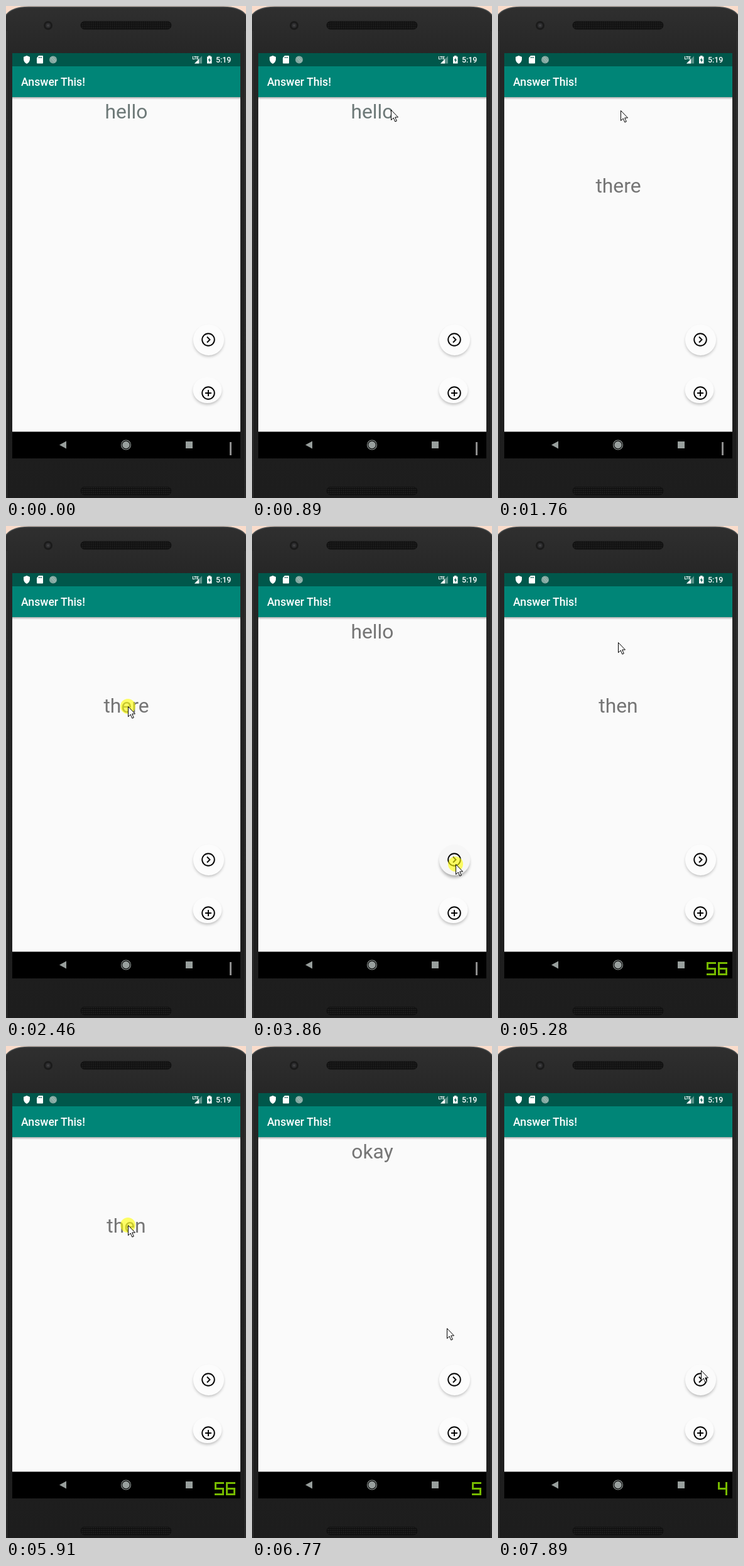
Animation of 382x783 px, one loop 8 s. Source, as an HTML page:

```html
<!DOCTYPE html>
<html lang="en">
<head>
<meta charset="utf-8">
<title>Answer This!</title>
<style>
  html, body { margin: 0; width: 100%; height: 100%; overflow: hidden; background: #fadccb; }
  svg { display: block; width: 100%; height: 100%; }
  text { font-family: Roboto, sans-serif; }
</style>
</head>
<body>
<svg viewBox="0 0 382 783">
  <defs>
    <linearGradient id="body" x1="0" y1="0" x2="0" y2="1">
      <stop offset="0" stop-color="#2f2f2f"/>
      <stop offset=".1" stop-color="#262626"/>
      <stop offset="1" stop-color="#1d1d1d"/>
    </linearGradient>
    <linearGradient id="barShade" x1="0" y1="0" x2="0" y2="1">
      <stop offset="0" stop-color="#000" stop-opacity=".3"/>
      <stop offset="1" stop-color="#000" stop-opacity="0"/>
    </linearGradient>
    <pattern id="mesh" width="3" height="3" patternUnits="userSpaceOnUse">
      <rect width="3" height="3" fill="#101010"/>
      <circle cx="1.5" cy="1.5" r=".8" fill="#2c2c2c"/>
    </pattern>
    <filter id="soft" x="-40%" y="-40%" width="180%" height="180%">
      <feGaussianBlur stdDeviation="2.6"/>
    </filter>
  </defs>

  <!-- phone -->
  <rect width="382" height="783" fill="#fadccb"/>
  <path d="M-2 785V18Q6 1.5 36 1.5H346Q376 1.5 384 18V785Z" fill="url(#body)" stroke="#4b5153" stroke-width="1.5"/>
  <path d="M1.5 40V783M380.5 40V783" stroke="#363636"/>
  <circle cx="67" cy="31" r="7" fill="#1b1b1b"/>
  <circle cx="67" cy="31" r="4" fill="#2e2e30"/>
  <circle cx="67" cy="31" r="1.8" fill="#444"/>
  <rect x="119" y="24.5" width="144" height="12.5" rx="6" fill="url(#mesh)" stroke="#121212"/>
  <rect x="119" y="765.5" width="144" height="12.5" rx="6" fill="url(#mesh)" stroke="#121212"/>

  <!-- screen -->
  <rect x="10" y="75" width="363" height="645" fill="#fafafa"/>
  <rect x="10" y="75" width="363" height="21" fill="#00574b"/>
  <rect x="10" y="96" width="363" height="49" fill="#008577"/>
  <rect x="10" y="145" width="363" height="4" fill="url(#barShade)"/>
  <rect x="10" y="677.5" width="363" height="42.5" fill="#000"/>
  <text x="24" y="127.3" font-size="17.66" font-weight="500" fill="#fff">Answer This!</text>

  <!-- status bar -->
  <g fill="#fff">
    <path d="M33 79L38 81V85Q37.500 90 33 92Q28.500 90 28 85V81Z"/>
    <path d="M52 79H58Q59 79 59 80V90.500Q59 91.500 58 91.500H50Q49 91.500 49 90.500V82.500Z"/>
    <path d="M52.500 81V83M54.500 81V83M56.500 81V83" stroke="#00574b"/>
    <circle cx="75" cy="85.500" r="6" fill="#84a8a1"/>
    <path d="M71 82L78 90M73 80.500L80 88" stroke="#a9c2bd"/>
    <text x="296.500" y="85" font-size="7" font-weight="700" textLength="auto" letter-spacing="-.5">LTE</text>
    <path d="M312 79.500V91.500H300Z" opacity=".35"/>
    <path d="M307 84.500V91.500H300Z"/>
    <path d="M320 80.500H322V79H325.500V80.500H327.500V91.500H320Z"/>
    <path d="M324.300 82.200L321.700 86.600H323.500V90L326 85.600H324.300Z" fill="#00574b"/>
    <text x="334" y="90.200" font-size="12.4" font-weight="500">5:19</text>
  </g>

  <!-- navigation bar -->
  <g fill="#989f9d">
    <path d="M85 698.500L96 692.500V704.500Z"/>
    <circle cx="191" cy="698.500" r="5.800"/>
    <circle cx="191" cy="698.500" r="7.500" fill="none" stroke="#989f9d" stroke-width="1.100"/>
    <rect x="286" y="693" width="11" height="11"/>
  </g>
  <g id="counter"></g>

  <text id="word" x="191.500" font-size="31.8" text-anchor="middle"></text>

  <!-- buttons -->
  <ellipse id="nextShade" cx="322.500" cy="534" rx="23.500" ry="23.500" filter="url(#soft)"/>
  <circle id="next" cx="322.500" cy="531.300" r="24.600"/>
  <ellipse cx="320.500" cy="614.500" rx="22" ry="19.500" fill="#000" opacity=".28" filter="url(#soft)"/>
  <rect x="297.500" y="590.500" width="46" height="41.500" rx="23" ry="20.750" fill="#fcfcfc"/>
  <g fill="none" stroke="#000" stroke-width="1.900">
    <circle cx="322" cy="531" r="9.800"/>
    <path d="M320 526.500L324.500 531L320 535.500"/>
    <circle cx="322" cy="616" r="9.800"/>
    <path d="M317 616H327M322 611V621"/>
  </g>

  <circle id="spot" r="12" fill="#ffff00" opacity=".6"/>
  <path id="arrow" d="M.5 .5V16.500L4.200 13L6.800 19L9.300 18L6.700 12H11.500Z" fill="#fff" stroke="#000"/>
</svg>

<script>
const LOOP = 8000, TOP = 179.3, MID = 296.5;
const $ = id => document.getElementById(id);
const set = (el, attrs) => { for (const k in attrs) el.setAttribute(k, attrs[k]); };

const smooth = p => p * p * (3 - 2 * p);
const linear = p => p;
const easeIn = p => 1 - Math.cos(p * Math.PI / 2);
const easeOut = p => Math.sin(p * Math.PI / 2);

// Pointer moves: first step, last step, number of steps, end point, easing, sideways bend
const start = [288, 743];
const moves = [
  [200, 890, 10, 221, 165, smooth],
  [970, 1140, 3, 195, 166, linear],
  [1990, 2230, 4, 194, 287, smooth, -5],
  [2620, 2620, 1, 194, 286, linear],
  [2850, 3550, 10, 324, 538, smooth],
  [4260, 5060, 11, 191, 185, smooth],
  [5360, 5510, 3, 200, 299, smooth],
  [5680, 5830, 3, 194, 285, smooth],
  [6460, 6770, 5, 310, 449, easeIn],
  [6850, 6930, 2, 324, 511, easeOut],
  [7090, 7090, 1, 323, 516, linear]
];
const clicks = [[1600, 1760], [2460, 2620], [3790, 4020], [5130, 5280], [5910, 6220], [7170, 7410]];
const words = [
  [0, 'hello', TOP, '#6d7978'], [1760, 'there', MID], [2620, 'hello', TOP], [4020, 'okay', TOP],
  [5280, 'then', MID], [6220, 'okay', TOP], [7410, '', TOP]
];
const counts = [[0, '1'], [5060, '56'], [6220, '5'], [7410, '4']];
const presses = [[0, 0], [3790, .5], [3860, 1], [4020, .5], [4100, 0],
  [7170, .5], [7250, 1], [7410, .8], [7650, .5], [7890, .25]];

const latest = (list, t) => list.filter(e => e[0] <= t).pop();

function pointer(t) {
  let [x, y] = start;
  for (const [t0, t1, n, toX, toY, ease, bend = 0] of moves) {
    if (t < t0) break;
    const step = t1 > t0 ? Math.floor((t - t0) / (t1 - t0) * (n - 1) + .08) : 0;
    const p = Math.min(1, (step + 1) / n), e = ease(p);
    x += (toX - x) * e + bend * Math.sin(Math.PI * p);
    y += (toY - y) * e;
  }
  return [Math.round(x), Math.round(y)];
}

// Seven-segment digits, 15 by 21
const segments = {
  a: 'M0 0h15v3h-15z', b: 'M12 0h3v10.500h-3z', c: 'M12 10.500h3v10.500h-3z', d: 'M0 18h15v3h-15z',
  e: 'M0 10.500h3v10.500h-3z', f: 'M0 0h3v10.500h-3z', g: 'M0 9h15v3h-15z'
};
const lit = { 4: 'bcfg', 5: 'acdfg', 6: 'acdefg' };

function counter(value) {
  if (value === '1') return '<rect x="356" y="694" width="3" height="21" fill="#8c8c8c"/>';
  return [...value].map((digit, i) => {
    const x = 350 - 18 * (value.length - 1 - i);
    const d = [...lit[digit]].map(s => segments[s]).join('');
    return `<path transform="translate(${x} 694)" d="${d}" fill="#76b900"/>`;
  }).join('');
}

let shown;
function draw(t) {
  const [, text, y, fill = '#757575'] = latest(words, t);
  $('word').textContent = text;
  set($('word'), { y, fill });

  const value = latest(counts, t)[1];
  if (value !== shown) $('counter').innerHTML = counter(shown = value);

  const press = latest(presses, t)[1];
  set($('next'), { fill: `rgb(${Array(3).fill(252 - 6 * press)})` });
  set($('nextShade'), { cy: 534 + 2 * press, opacity: .28 + .04 * press });

  const [px, py] = pointer(t);
  set($('arrow'), { transform: `translate(${px} ${py})`, visibility: t < 200 ? 'hidden' : 'visible' });
  const down = clicks.some(([on, off]) => t >= on && t < off);
  set($('spot'), { cx: px, cy: py, visibility: down ? 'visible' : 'hidden' });
}

const begin = performance.now();
function tick() {
  draw((performance.now() - begin) % LOOP);
  requestAnimationFrame(tick);
}
tick();
</script>
</body>
</html>
```
